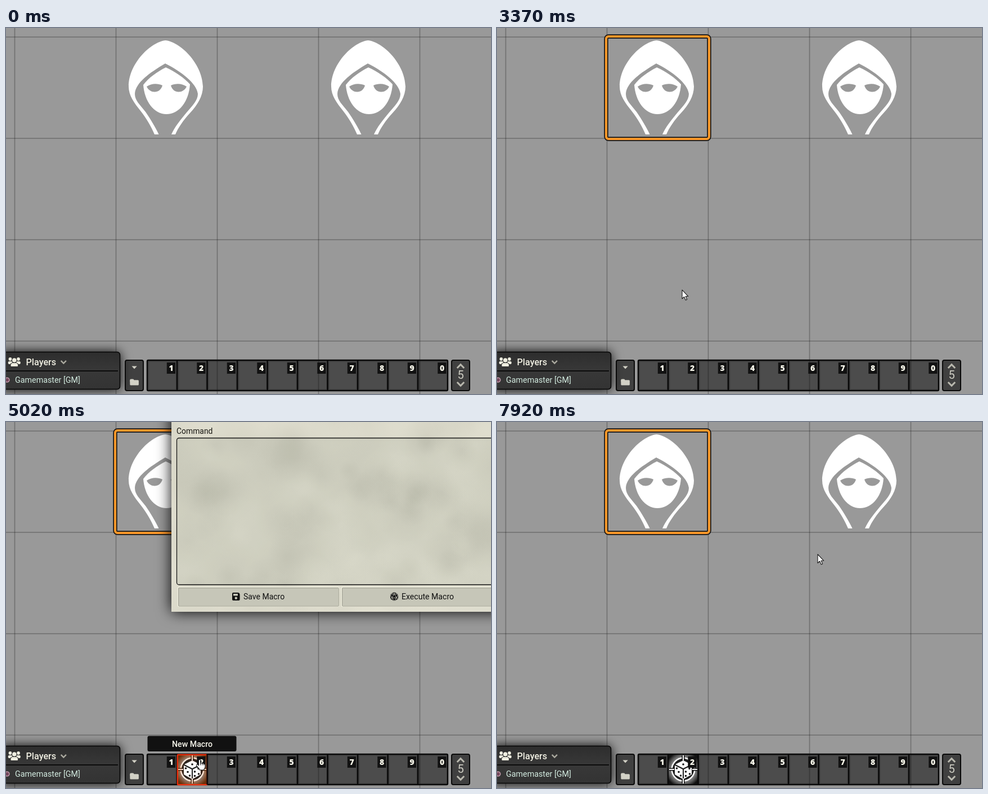
An HTML page with a canvas that plays this animation: 862 by 650 pixels, repeating every 8 s.

```html
<!DOCTYPE html>
<html lang="en">
<head>
<meta charset="utf-8">
<title>Macro bar</title>
<style>
html, body { margin: 0; width: 100%; height: 100%; overflow: hidden; background: #999; }
canvas { display: block; }
</style>
</head>
<body>
<canvas id="stage" width="862" height="650"></canvas>
<script>
const W = 862, H = 650, LOOP = 8000;
const ctx = document.getElementById('stage').getContext('2d');
const FONT = 'Roboto, "Open Sans", sans-serif';

// Pointer moves: start, end, from x, y, to x, y, ease-out power
const MOVES = [
  [450, 830, 659, 558, 441, 317, 1.6],
  [1070, 1560, 441, 317, 346, 189, 2],
  [1780, 2010, 346, 189, 281, 124, 1.5],
  [2160, 2240, 281, 124, 287, 136, 1],
  [2240, 2850, 287, 136, 300, 265, 1.2],
  [3000, 3600, 300, 265, 338, 527, 1.5],
  [3830, 4530, 338, 527, 344, 599, 1.5],
  [5090, 5550, 344, 599, 470, 439, 1.1],
  [5550, 5640, 470, 439, 486, 428, 1],
  [5870, 6340, 486, 428, 541, 358, 3.1],
  [6590, 6960, 541, 358, 528, 325, 1.6],
  [7840, 7920, 528, 325, 570, 235, 1]
];

const hood = new Path2D('M283.5 22C259 24 218 62 218 104C218 120 228 133 239 147C250 161 258 175 264 189H271.5' +
  'C266 177 257 162 248 149C238 136 229 129 229 117C230 97 256 79 283 63C311 77 339 98 341 117C341 129 331 138 321 150' +
  'C310 163 299 177 294 189H301C306 177 315 164 327 151C340 137 350 121 350 104C349 62 308 24 283.5 22Z');
const face = new Path2D('M284 70C268 78 254 88 244 101C246 130 263 153 285 153C308 153 325 130 327 100C316 88 300 77 284 70Z');
const eyes = new Path2D('M250 104C258 98 270 98 278 102C274 117 256 117 250 104ZM293 102C301 98 313 98 321 104C315 117 297 117 293 102Z');
const arrow = new Path2D('M0 0V15.5L3.6 12.2L6.2 18L8.6 17L6.1 11.3H10.8Z');
const hand = new Path2D('M-1.6 1.6Q0 -1.4 1.6 1.6V7Q3.6 5.6 4.8 7.4Q6.8 6.2 7.6 8.2Q10 7.6 10 10.4V13.5' +
  'Q9.8 16 8 17.3V19H0V17.5L-5.4 11.4Q-5.6 8.3 -3.2 9.3L-1.6 11Z');

const clamp = v => Math.max(0, Math.min(1, v));
const swing = p => 0.5 - Math.cos(Math.PI * clamp(p)) / 2;

function pointerAt(t) {
  let [x, y] = [659, 558];
  for (const [t0, t1, x0, y0, x1, y1, pow] of MOVES) {
    if (t < t0) break;
    const p = 1 - Math.pow(1 - clamp((t - t0) / (t1 - t0)), pow);
    x = x0 + (x1 - x0) * p;
    y = y0 + (y1 - y0) * p;
  }
  return { x, y };
}

function box(x, y, w, h, r, fill, stroke, lw = 1) {
  ctx.beginPath();
  ctx.roundRect(x, y, w, h, r);
  if (fill) { ctx.fillStyle = fill; ctx.fill(); }
  if (stroke) { ctx.strokeStyle = stroke; ctx.lineWidth = lw; ctx.stroke(); }
}

function text(str, x, y, size, color, align = 'left', weight = 400, family = FONT) {
  ctx.font = `${weight} ${size}px ${family}`;
  ctx.textAlign = align;
  ctx.textBaseline = 'alphabetic';
  ctx.fillStyle = color;
  ctx.fillText(str, x, y);
}

function poly(points, color) {
  ctx.beginPath();
  for (let i = 0; i < points.length; i += 2) ctx.lineTo(points[i], points[i + 1]);
  ctx.closePath();
  ctx.fillStyle = color;
  ctx.fill();
}

function dot(x, y, r, color) {
  ctx.beginPath();
  ctx.arc(x, y, r, 0, 7);
  ctx.fillStyle = color;
  ctx.fill();
}

function chevron(x, y, w, h, color, lw) {
  ctx.beginPath();
  ctx.moveTo(x - w, y - h);
  ctx.lineTo(x, y + h);
  ctx.lineTo(x + w, y - h);
  ctx.strokeStyle = color;
  ctx.lineWidth = lw;
  ctx.stroke();
}

function shadow(color, blur) {
  ctx.shadowColor = color;
  ctx.shadowBlur = blur;
}

// Soft mottled parchment from seeded blobs
const paper = (() => {
  const c = document.createElement('canvas');
  c.width = 568; c.height = 337;
  const g = c.getContext('2d');
  g.fillStyle = '#d6d5c7';
  g.fillRect(0, 0, 568, 337);
  let seed = 11;
  const rnd = () => (seed = seed * 16807 % 2147483647) / 2147483647;
  for (let i = 0; i < 170; i++) {
    const x = rnd() * 568, y = rnd() * 337, r = 18 + rnd() * 55;
    const rgb = rnd() < 0.5 ? '238,237,222' : '150,150,136';
    const grad = g.createRadialGradient(x, y, 0, x, y, r);
    grad.addColorStop(0, `rgba(${rgb},.1)`);
    grad.addColorStop(1, `rgba(${rgb},0)`);
    g.fillStyle = grad;
    g.fillRect(x - r, y - r, 2 * r, 2 * r);
  }
  return c;
})();

function drawGrid() {
  ctx.fillStyle = '#999';
  ctx.fillRect(0, 0, W, H);
  ctx.fillStyle = 'rgba(0,0,0,.27)';
  for (let i = 0; i < 5; i++) {
    ctx.fillRect(14.7 + i * 180, 0, 1.6, H);
    if (i < 4) ctx.fillRect(0, 15.2 + i * 180, W, 1.6);
  }
}

function drawToken(dx) {
  ctx.save();
  ctx.translate(dx, 0);
  ctx.fillStyle = '#fff';
  ctx.fill(hood);
  ctx.fill(face);
  ctx.fillStyle = '#999';
  ctx.fill(eyes);
  ctx.restore();
}

function drawFrame(color) {
  box(194, 15, 183, 182, 4, null, '#151515', 7.4);
  box(194, 15, 183, 182, 4, null, color, 4);
}

function drawName() {
  ctx.save();
  shadow('rgba(0,0,0,.9)', 4);
  ctx.font = `400 34px ${FONT}`;
  ctx.textAlign = 'center';
  ctx.strokeStyle = '#333';
  ctx.lineWidth = 3;
  ctx.lineJoin = 'round';
  ctx.strokeText('NPC', 285.5, 238);
  ctx.restore();
  text('NPC', 285.5, 238, 34, '#fff', 'center');
}

function drawPlayers() {
  ctx.save();
  shadow('#000', 20);
  box(-10, 575, 212.5, 67, 5, '#303030');
  ctx.restore();
  const g = ctx.createLinearGradient(0, 575, 0, 642);
  g.addColorStop(0, '#2d2d2d');
  g.addColorStop(0.5, '#383838');
  g.addColorStop(1, '#333');
  box(-10, 575.5, 212.5, 66, 5, g, '#050505', 1.6);
  ctx.fillStyle = '#0b0b0b';
  ctx.fillRect(0, 608, 199, 2);

  const ink = '#efeee0';
  for (const x of [7.5, 22]) {
    dot(x, 588, 2.9, ink);
    box(x - 3.8, 592, 7.6, 5, 2, ink);
  }
  dot(14.8, 590, 4.8, '#303030');
  dot(14.8, 590, 3.8, ink);
  box(7.5, 594.5, 14.6, 7, [4, 4, 2, 2], '#303030');
  box(8.5, 595, 12.6, 6, [4, 4, 1, 1], ink);

  text('Players', 35.5, 599, 16.2, '#f0efe2', 'left', 500);
  chevron(102.3, 593.2, 4.6, 2.4, '#aaa99f', 2.4);
  dot(2, 625, 4.6, '#d4a9bb');
  dot(2, 625, 3.3, '#75495d');
  text('Gamemaster [GM]', 16, 630, 14.3, '#d3ebe0');
}

function drawDie() {
  const x = 331, y = 617;
  ctx.save();
  ctx.beginPath();
  ctx.rect(305, 591, 52, 52);
  ctx.clip();
  ctx.fillStyle = '#111';
  ctx.fillRect(305, 591, 52, 52);
  const g = ctx.createRadialGradient(x, y, 13, x, y, 32);
  g.addColorStop(0, '#222');
  g.addColorStop(0.4, '#8d8d8d');
  g.addColorStop(0.7, '#555');
  g.addColorStop(1, '#111');
  ctx.fillStyle = g;
  ctx.fillRect(305, 591, 52, 52);
  dot(x, y, 19, '#202020');
  ctx.beginPath();
  ctx.arc(x, y, 20.3, 0, 7);
  ctx.strokeStyle = '#fff';
  ctx.lineWidth = 2.3;
  ctx.stroke();
  for (let i = 0; i < 4; i++) {
    ctx.save();
    ctx.translate(x, y);
    ctx.rotate(i * Math.PI / 2);
    ctx.fillStyle = '#111';
    ctx.fillRect(-2.5, -25, 5, 9);
    ctx.fillStyle = '#fff';
    ctx.fillRect(-1, -25, 2, 9);
    ctx.restore();
  }
  poly([331, 601, 345, 608, 331, 615, 317, 608], '#fff');
  poly([316, 610, 330, 617, 330, 634, 316, 626], '#fff');
  poly([346, 610, 332, 617, 332, 634, 346, 626], '#fff');
  for (const [a, b] of [[331, 608], [319.5, 615], [326.5, 628], [323, 621.5], [335.5, 621], [342.5, 625], [342, 615.5], [335.5, 628.5]])
    dot(a, b, 1.8, '#161616');
  ctx.restore();
}

function slotGlow() {
  ctx.save();
  ctx.beginPath();
  ctx.rect(305, 591, 52, 53);
  ctx.clip();
  shadow('#ff6400', 14);
  for (let i = 0; i < 2; i++) box(304, 590, 54, 55, 0, null, '#c2571a', 3);
  ctx.restore();
}

function sideBox(x) {
  box(x, 590, 32, 54, 3, 'rgba(0,0,0,.58)', '#0a0a0a', 2);
}

function drawHotbar(hasMacro, hover) {
  const ink = '#d2d1c6';
  sideBox(212);
  poly([223.5, 600.5, 232.8, 600.5, 228.1, 605.6], ink);
  box(220.3, 623.5, 7, 5, 1.5, ink);
  box(220.3, 625.3, 15.6, 9.2, 1.5, ink);

  box(250, 589, 536, 56, 3, 'rgba(0,0,0,.5)');
  box(251, 590, 534, 54, 2, null, '#090909', 2.4);
  for (let i = 0; i < 10; i++) {
    const x = 250.5 + i * 53.5;
    if (i) {
      ctx.fillStyle = '#090909';
      ctx.fillRect(x - 1.2, 590, 2.6, 54);
    }
    box(x + 2.6, 592.2, 49.4, 49.8, 0, null, 'rgba(0,0,0,.16)', 1.6);
    if (i === 1) {
      if (hasMacro) drawDie();
      if (hover) slotGlow();
      if (hover && hasMacro) box(304.8, 590.8, 52.6, 53.4, 1, null, '#f92d0c', 2);
    }
    ctx.fillStyle = '#121212';
    ctx.fillRect(x + 35.3, 594, 15.2, 20);
    text(String((i + 1) % 10), x + 43, 609, 14, '#f7f6ea', 'center', 800, '"Open Sans", "Noto Sans", sans-serif');
  }

  sideBox(792);
  chevron(808, 600.8, 6.2, -3.2, '#b9b8ae', 3);
  chevron(808, 632.2, 6.2, 3.2, '#b9b8ae', 3);
  text('5', 808, 623, 20, '#cfcec4', 'center');
}

function drawTooltip() {
  box(251.5, 557.5, 158, 27.5, 3, '#111');
  text('New Macro', 331, 577, 14.2, '#f6f5ea', 'center', 500);
}

function button(x, y, w, hot) {
  ctx.save();
  if (hot) shadow('#f00', 6);
  box(x, y, w, 35, 2, '#c6c6b8');
  ctx.restore();
  box(x + 0.5, y + 0.5, w - 1, 34, 1, null, '#f0efdf', 1.4);
  box(x + 1.7, y + 1.7, w - 2.4, 32.4, 1, null, '#96968a', 0.9);
}

function saveIcon(y) {
  box(402, y - 7, 13.6, 14, [2, 4, 2, 2], '#111');
  ctx.fillStyle = '#c6c6b8';
  ctx.fillRect(404, y - 5, 8, 3.6);
  dot(408.8, y + 2.8, 2.2, '#c6c6b8');
}

function d20Icon(y) {
  ctx.save();
  ctx.translate(690, y);
  const hex = [], tri = [];
  for (let i = 0; i < 6; i++) {
    const a = i * Math.PI / 3 - Math.PI / 2;
    hex.push([8 * Math.cos(a), 8 * Math.sin(a)]);
    if (i % 2 === 0) tri.push([4.8 * Math.cos(a), 4.8 * Math.sin(a)]);
  }
  poly(hex.flat(), '#111');
  ctx.beginPath();
  tri.forEach((p, i) => {
    ctx.moveTo(...p);
    ctx.lineTo(...tri[(i + 1) % 3]);
    for (const k of [5, 0, 1]) {
      ctx.moveTo(...p);
      ctx.lineTo(...hex[(2 * i + k) % 6]);
    }
  });
  ctx.strokeStyle = '#c6c6b8';
  ctx.lineWidth = 0.9;
  ctx.stroke();
  ctx.restore();
}

function drawDialog(cut, alpha, hot) {
  const bottom = 337 - cut;
  if (alpha <= 0 || bottom <= 0) return;
  const r = cut > 0 ? 5 : 1;
  ctx.save();
  ctx.globalAlpha = alpha;
  ctx.save();
  shadow('#000', 27);
  box(294, -80, 640, bottom + 80, r, '#d6d5c7');
  ctx.restore();

  ctx.beginPath();
  ctx.roundRect(294, -80, 640, bottom + 80, r);
  ctx.clip();
  ctx.drawImage(paper, 294, 0);
  ctx.fillStyle = 'rgba(240,238,218,.28)';
  ctx.fillRect(294, 0, 568, bottom);
  const top = 28.5 - Math.min(1, cut / 59);
  if (bottom > 76) {
    ctx.save();
    box(303.5, top, 600, bottom - 48 - top, 4);
    ctx.clip();
    ctx.drawImage(paper, 294, 0);
    ctx.fillStyle = 'rgba(110,112,90,.06)';
    ctx.fillRect(294, 0, 568, bottom);
    ctx.restore();
    box(303.5, top, 600, bottom - 48 - top, 4, null, '#141414', 1.3);
    text('Command', 303, top - 8, 13.9, '#191813');
  }
  const by = bottom - 44, mid = by + 17;
  button(305, by, 287, hot);
  button(596, by, 287, false);
  saveIcon(mid);
  d20Icon(mid);
  text('Save Macro', 422, mid + 5, 14, '#111');
  text('Execute Macro', 703, mid + 5, 14.1, '#111');
  ctx.restore();
}

function drawPointer(p, shape) {
  ctx.save();
  ctx.translate(p.x, p.y);
  ctx.lineJoin = 'round';
  ctx.fillStyle = '#fff';
  ctx.strokeStyle = '#1a1a1a';
  ctx.lineWidth = 1.1;
  ctx.fill(shape);
  ctx.stroke(shape);
  if (shape === hand) {
    ctx.beginPath();
    for (const x of [1.6, 4.8, 7.6]) {
      ctx.moveTo(x, 7);
      ctx.lineTo(x, 10.5);
    }
    ctx.stroke();
  }
  ctx.restore();
}

function draw(t) {
  const p = pointerAt(t);
  const overToken = t > 1070 && t < 3000 && (t > 1560 || (p.x < 376 && p.y < 196));
  const overSlot = t > 3830 && t < 5640 && p.y > 590;
  const hasMacro = t >= 4830;
  const cut = 367 * swing((t - 7227) / 240);
  const overSave = t > 6590 && t < 7227 && p.y < 328;

  drawGrid();
  drawToken(0);
  drawToken(360);
  if (t >= 2160) drawFrame('#ff9829');
  else if (overToken) drawFrame('#e72124');
  if (overToken) drawName();
  drawPlayers();
  drawHotbar(hasMacro, overSlot);
  if (t >= 4830 && t < 7467) drawDialog(cut, clamp((t - 4830) / 180), overSave);
  if (overSlot && t >= 4900) drawTooltip();
  if (t >= 450) drawPointer(p, overToken || overSlot || overSave ? hand : arrow);
}

const start = performance.now();
function tick() {
  draw((performance.now() - start) % LOOP);
  requestAnimationFrame(tick);
}
tick();
</script>
</body>
</html>
```
